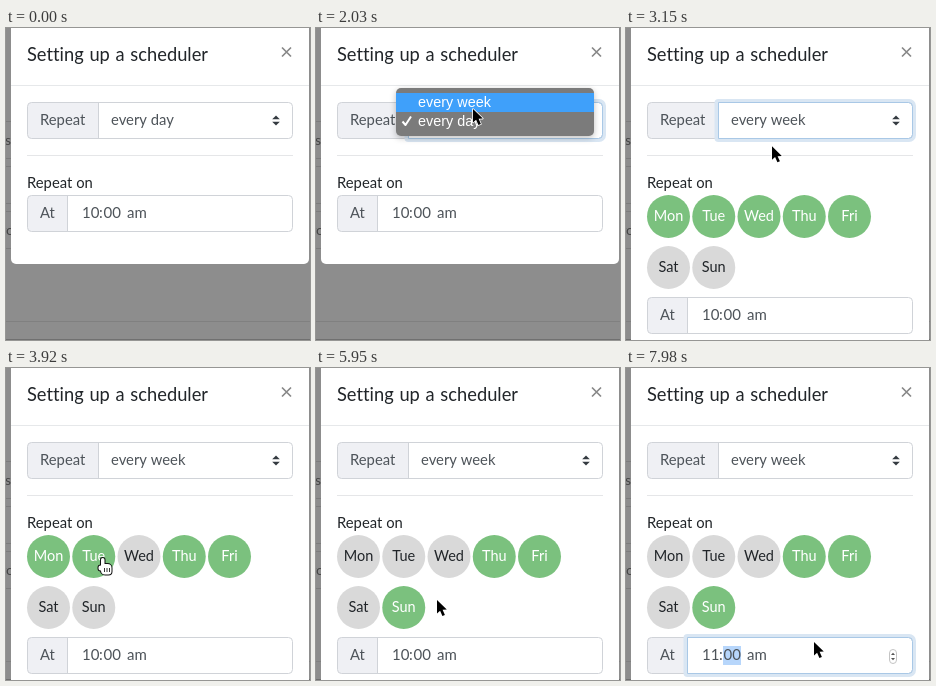
Animation, 304 px wide and 312 px high, one loop 8 s. Source, as an HTML page with a canvas:

```html
<!DOCTYPE html>
<html lang="en">
<head>
<meta charset="utf-8">
<title>Setting up a scheduler</title>
<style>
html, body { margin: 0; width: 100%; height: 100%; overflow: hidden; background: #8d8d8d; }
canvas { display: block; width: 304px; height: 312px; }
</style>
</head>
<body>
<canvas id="stage" width="304" height="312"></canvas>
<script>
const ctx = document.getElementById('stage').getContext('2d');
const LOOP = 8000, STEP = 70;
const UI = 'Lato, "Open Sans", sans-serif';
const MENU = '"Liberation Sans", Arial, sans-serif';
const INK = '#212529', SOFT = '#4d5359', LINE = '#d0d3d8';
const LEFT = 21, WIDTH = 266, FIELD_H = 37;

// Moments of the story, in ms
const FOCUS = 1050, OPEN = 1540, BLINK = 2450, CHOOSE = 2730, EDIT = 6510, TYPE = 7280, NEXT = 7560;
const clicks = { Wed: 3430, Tue: 4130, Mon: 4480, Sun: 5250 };

const days = ['Mon', 'Tue', 'Wed', 'Thu', 'Fri', 'Sat', 'Sun'].map((name, i) => ({
  name,
  x: 42.5 + (i % 5) * 45.25,
  y: 188.5 + Math.floor(i / 5) * 51,
  on: i < 5,
  click: clicks[name]
}));

// Pointer moves: start, end, then where it comes to rest
const moves = [
  [70, 840, 171, 101],
  [1680, 2030, 157, 81],
  [3010, 3430, 124, 193],
  [3780, 3920, 97, 190],
  [4130, 4270, 54, 194],
  [4900, 5390, 89, 239],
  [5600, 5740, 108, 274],
  [5740, 5950, 121, 232],
  [5950, 6090, 109, 203],
  [6090, 6370, 88, 283],
  [7280, 7420, 138, 285],
  [7700, 7980, 188, 274]
];

const clamp = v => Math.min(1, Math.max(0, v));
const fade = (t, at) => clamp((t - at + STEP) / 140);
const mix = (a, b, k) => `rgb(${a.map((v, i) => Math.round(v + (b[i] - v) * k))})`;
const bezier = (a, b, c, k) => a * (1 - k) ** 2 + 2 * b * k * (1 - k) + c * k * k;

function pointerAt(t) {
  let x = 45, y = 312;
  for (const [from, to, tx, ty] of moves) {
    if (t < from) break;
    const k = clamp((t - from) / (to - from));
    const entry = from === moves[0][0];
    // The entry sweeps up along the left side; later moves are straight
    x = bezier(x, entry ? 0 : (x + tx) / 2, tx, k);
    y = bezier(y, entry ? -120 : (y + ty) / 2, ty, k);
  }
  return { x, y };
}

function rect(x, y, w, h, color) {
  ctx.fillStyle = color;
  ctx.fillRect(x, y, w, h);
}

function round(x, y, w, h, r) {
  ctx.beginPath();
  ctx.roundRect(x, y, w, h, r);
}

function fill(color) {
  ctx.fillStyle = color;
  ctx.fill();
}

function stroke(color, width = 1) {
  ctx.strokeStyle = color;
  ctx.lineWidth = width;
  ctx.stroke();
}

function text(s, x, y, size, color, family = UI, align = 'left') {
  ctx.font = `${size}px ${family}`;
  ctx.letterSpacing = '0.01px'; // keeps "tt" from joining
  ctx.textAlign = align;
  ctx.fillStyle = color;
  ctx.fillText(s, x, y);
}

// Pair of small triangles pointing up and down
function carets(x, y, w, h, gap, color) {
  for (const dir of [-1, 1]) {
    const base = y + dir * gap;
    ctx.beginPath();
    ctx.moveTo(x - w, base);
    ctx.lineTo(x, base + dir * h);
    ctx.lineTo(x + w, base);
    fill(color);
  }
}

function backdrop() {
  rect(0, 0, 304, 312, '#8d8d8d');
  for (let y = 93; y < 190; y += 45) {
    rect(0, y, 5, 1, '#7c7c7c');
    rect(0, y + 37, 5, 1, '#7c7c7c');
  }
  text('s', 5, 117, 14, '#444', UI, 'right');
  text('ro', 8, 207, 14, '#444', UI, 'right');
  rect(0, 293, 304, 1, '#808080');
  rect(0, 311, 304, 1, '#707070');
}

// Input group: grey label on the left, white field with an optional focus glow
function group(y, split, label, focus) {
  round(LEFT + .5, y + .5, WIDTH - 1, FIELD_H - 1, 4);
  fill('#fff');
  ctx.save();
  ctx.clip();
  rect(LEFT, y, split - LEFT, FIELD_H, '#eff0f4');
  ctx.restore();
  stroke(LINE);
  rect(split, y, 1, FIELD_H, LINE);
  text(label, 34, y + 23, 14.8, SOFT);

  const w = LEFT + WIDTH - split;
  ctx.globalAlpha = focus;
  round(split - 1.5, y - 1, w + 2.5, FIELD_H + 2, [2, 5, 5, 2]);
  stroke('#d9e6f3', 4);
  round(split + .5, y + .5, w - 1, FIELD_H - 1, [0, 4, 4, 0]);
  stroke('#a9c8e6');
  ctx.globalAlpha = 1;
}

function header() {
  ctx.wordSpacing = '1px';
  text('Setting up a scheduler', LEFT, 33, 18.3, INK);
  ctx.wordSpacing = '0px';
  ctx.beginPath();
  for (const dir of [-1, 1]) {
    ctx.moveTo(280.5 - 4.5 * dir, 19.5);
    ctx.lineTo(280.5 + 4.5 * dir, 28.5);
  }
  stroke('#888', 1.7);
  rect(5, 57, 298, 1, '#e6e8ea');
}

function select(t, weekly) {
  group(74, 92, 'Repeat', fade(t, FOCUS) * (1 - fade(t, clicks.Wed)));
  text(weekly ? 'every week' : 'every day', 105, 97, 14.8, SOFT);
  carets(270, 92.5, 3.8, 3.8, 1.3, '#343a40');
}

function drawDays(t) {
  for (const { name, x, y, on, click } of days) {
    const k = click ? fade(t, click) : 0;
    const level = on ? 1 - k : k;
    ctx.beginPath();
    ctx.arc(x, y, 21.5, 0, 7);
    fill(mix([217, 217, 217], [123, 193, 126], level));
    text(name, x, y + 4.5, 14.5, mix([33, 37, 41], [255, 255, 255], level), UI, 'center');
  }
}

function timeField(t, y, hover) {
  group(y, 61, 'At', t < EDIT ? 0 : fade(t, EDIT));
  if (t >= EDIT) rect(t < NEXT ? 76 : 97, y + 9, 18, 19, '#b7d6fb');
  const base = y + 23;
  text(t < TYPE ? '10' : t < NEXT ? '01' : '11', 76, base, 15, SOFT);
  text(':', 93, base, 15, SOFT);
  text('00', 97.5, base, 15, SOFT);
  text('am', 121, base, 15, SOFT);
  if (!hover) return;
  round(263.5, y + 12.5, 7, 14, 3.5);
  fill('#fff');
  stroke('#c4c4c4');
  carets(267, y + 19.5, 2, 2.3, 1.5, '#555');
}

function menu(t, pointerY) {
  if (t < OPEN || t >= BLINK + 3 * STEP) return;
  ctx.globalAlpha = t < BLINK + 2 * STEP ? 1 : .5;
  ctx.shadowColor = 'rgba(0,0,0,.25)';
  ctx.shadowBlur = 6;
  ctx.shadowOffsetY = 2;
  round(80, 60, 198, 48, 5);
  fill('#7b7b7b');
  ctx.shadowColor = 'transparent';
  const blink = t >= BLINK && t < BLINK + STEP;
  if (!blink) rect(80, pointerY < 85 ? 65 : 84, 198, 19, '#3fa0fa');
  text('every week', 102, 79, 14.4, '#fff', MENU);
  text('every day', 102, 98, 14.4, '#fff', MENU);
  ctx.beginPath();
  ctx.moveTo(86.5, 93.5);
  ctx.lineTo(89.5, 97);
  ctx.lineTo(95, 88.5);
  stroke('#fff', 2);
  ctx.globalAlpha = 1;
}

function arrow(x, y) {
  const outline = [[0, 0], [0, 13.5], [3.1, 10.7], [5.4, 16], [7.9, 15], [5.6, 9.8], [9.8, 9.6]];
  ctx.beginPath();
  outline.forEach(([dx, dy]) => ctx.lineTo(x + dx, y + dy));
  ctx.closePath();
  ctx.lineJoin = 'round';
  stroke('#fff', 1.6);
  fill('#000');
}

// Pointing finger, thumb and palm share one outline
function hand(x, y) {
  ctx.beginPath();
  ctx.roundRect(x - 2, y, 3.5, 12, 1.7);
  ctx.roundRect(x - 4.5, y + 7.5, 5, 5, 2);
  ctx.roundRect(x - 2, y + 6, 10.5, 10.5, [1, 4, 3, 4]);
  stroke('#111', 2);
  fill('#fff');
  for (let dx = 1; dx < 7; dx += 2.5) rect(x + dx, y + 10, 1, 4, '#333');
}

function draw(t) {
  const weekly = t >= CHOOSE;
  const { x, y } = pointerAt(t);
  const fieldY = weekly ? 269 : 167;
  const hover = x > 61 && x < LEFT + WIDTH && y > fieldY && y < fieldY + FIELD_H;

  backdrop();
  round(5, -8, 298, weekly ? 340 : 244, 5);
  fill('#fff');
  header();
  select(t, weekly);
  rect(LEFT, 127, WIDTH, 1, '#e5e6e8');
  text('Repeat on', LEFT, 160, 14.8, INK);
  if (weekly) drawDays(t);
  timeField(t, fieldY, hover);
  menu(t, y);

  if (t < moves[0][0]) return;
  const onDay = weekly && days.some(d => Math.hypot(d.x - x, d.y - y) < 21.5);
  (onDay ? hand : arrow)(x, y);
}

function tick() {
  const t = performance.now() % LOOP;
  draw(Math.floor(t / STEP) * STEP);
  requestAnimationFrame(tick);
}
tick();
</script>
</body>
</html>
```
